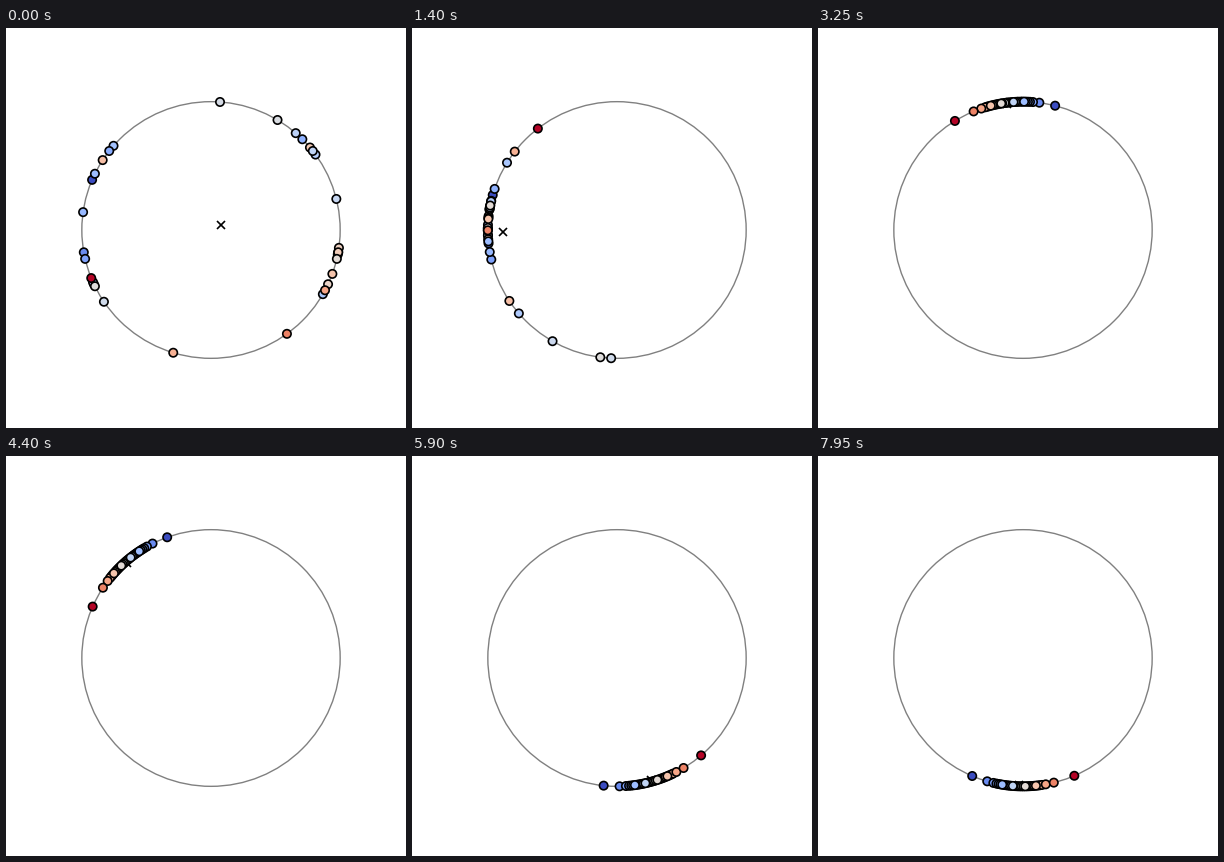
Write a matplotlib script that moves like this. It is 400 px wide and 400 px high and loops after 8 s.

```python
import numpy as np
import matplotlib.pyplot as plt
from matplotlib.animation import FuncAnimation

FRAMES = 160
COUPLING = 0.15               # per frame
DRIFT = np.radians(17.141)    # mean rotation per frame

# starting angles in degrees, from the slowest oscillator to the fastest
START = np.array([
    157, 190, 193, 142, 45, 172, 154, 139, 330, 204, 36, 49, 38, 14, 205, 214,
    86, 59, 206, 347, 350, 335, 352, 350, 40, 340, 147, 349, 253, 332, 306, 202,
])
COUNT = len(START)

# natural frequencies: evenly spread, with a few outliers at both ends
x = np.linspace(-1, 1, COUNT)
freq = 0.21 * x + (0.18 * x + 0.03) * x ** 16
freq -= freq.mean()

# mixed stacking order, so that colours overlap evenly
order = 13 * np.arange(COUNT) % COUNT


def simulate():
    """Kuramoto model: every phase is pulled towards the mean field."""
    phases = [np.radians(START)]
    for _ in range(FRAMES - 1):
        theta = phases[-1]
        field = np.exp(1j * theta).mean()
        pull = np.imag(field * np.exp(-1j * theta))
        phases.append(theta + DRIFT + COUPLING * (freq + pull))
    return np.exp(1j * np.array(phases))


points = simulate()[:, order]

fig, ax = plt.subplots(figsize=(4, 4), dpi=100)
ax.set_xlim(-1.2, 1.2)
ax.set_ylim(-1.2, 1.2)
ax.axis("off")
ax.add_patch(plt.Circle((0, 0), 1, fill=False, color="gray", lw=1))
dots = ax.scatter(points[0].real, points[0].imag, c=freq[order],
                  cmap="coolwarm", s=36, edgecolors="black",
                  linewidths=1.2, zorder=3)
centre, = ax.plot([], [], "kx", ms=6, mew=1.2, zorder=2)


def update(i):
    z = points[i]
    dots.set_offsets(np.column_stack([z.real, z.imag]))
    mean = z.mean()
    centre.set_data([mean.real], [mean.imag])
    return dots, centre


anim = FuncAnimation(fig, update, frames=FRAMES, interval=50, repeat=True)
plt.show()
```
